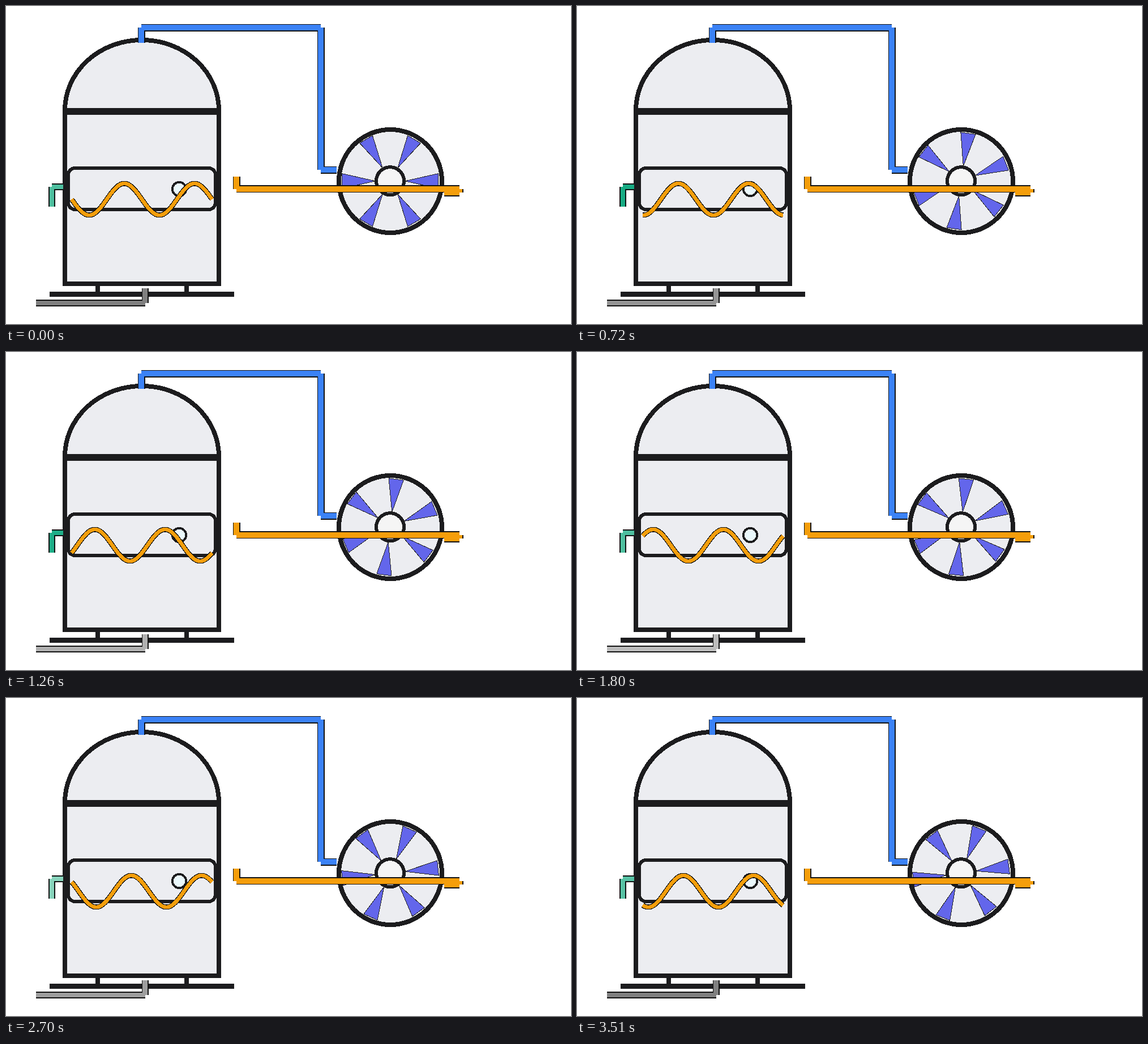
Recreate the animation shown at these times as an HTML page. Size 998x561 px, loop 3.6 s.

```html
<!DOCTYPE html>
<html lang="en">
<head>
<meta charset="utf-8">
<title>Tank and turbine</title>
<style>
  html, body { margin: 0; width: 100%; height: 100%; overflow: hidden; background: #fff; }
  svg { display: block; width: 998px; height: 561px; shape-rendering: crispEdges; fill: none; }
  .shell { fill: #ecedf1; stroke: #1c1c1e; }
  .edge { stroke: #111; }
</style>
</head>
<body>
<svg viewBox="0 0 998 561">
  <g class="shell" stroke-width="8">
    <path d="M161.5 492V506M318.5 492V506"/>
    <path d="M77 508H403" stroke-width="9"/>
    <path d="M104 184A136 124 0 0 1 376 184Z"/>
    <rect x="104" y="187.5" width="272" height="302.5"/>
    <rect x="110" y="286" width="260" height="73" rx="12" stroke-width="6"/>
    <circle cx="306" cy="323" r="12.2" stroke-width="4" fill="#eaf8fc" style="fill:#eaf8fc"/>
    <circle cx="679" cy="309" r="91" stroke-width="8"/>
  </g>
  <g id="blades" fill="#6366eb" stroke="#222" stroke-width="1"></g>
  <circle class="shell" cx="678.5" cy="308.7" r="24.5" stroke-width="6" style="fill:#f5f5f5"/>
  <g id="pipes"></g>
  <path id="waveEdge" class="edge" stroke-width="9"/>
  <path id="wave" stroke="#f59e0b" stroke-width="6.6"/>
</svg>
<script>
const STEP = 90, LOOP = 3600, TAU = 2 * Math.PI;
const byId = id => document.getElementById(id);

function add(parent, attrs) {
  const el = document.createElementNS('http://www.w3.org/2000/svg', 'path');
  for (const key in attrs) el.setAttribute(key, attrs[key]);
  return parent.appendChild(el);
}

// Each straight run is its own subpath, so corners stay notched.
function pipe(color, width, ...points) {
  const d = points.slice(1).map((p, i) => `M${points[i]}L${p}`).join('');
  add(byId('pipes'), { d, class: 'edge', 'stroke-width': width });
  return add(byId('pipes'), { d, stroke: color, 'stroke-width': width - 3.4 });
}

pipe('#3b82f6', 13, [239, 64.5], [239, 38], [556, 38], [556, 289], [584, 289]);
pipe('#f59e0b', 13, [407, 301], [407, 322.7], [801, 322.7], [801, 329], [774, 329]);
const drain = pipe('#808080', 12, [53, 524], [245.5, 524], [245.5, 498]);
const inlet = pipe('#4ebf9f', 12, [101, 319], [81, 319], [81, 354]);

for (let a = 0; a < 360; a += 60)
  add(byId('blades'), { d: 'M26.5 0L85 -13.2V13.2Z', transform: `rotate(${a})` });

function wavePath(phase) {
  let d = '';
  for (let x = 0; x <= 248; x += 2)
    d += `${d ? 'L' : 'M'}${116 + x} ${(341 + 28 * Math.sin(TAU * x / 124 + phase)).toFixed(2)}`;
  return d;
}

function draw(ms) {
  const t = Math.floor(ms % LOOP / STEP) * STEP;
  const cycle = TAU * t / LOOP, s = Math.sin(cycle);
  const grey = Math.round(158 - 30 * Math.cos(cycle));
  const d = wavePath(TAU * t / 3000);

  byId('wave').setAttribute('d', d);
  byId('waveEdge').setAttribute('d', d);
  byId('blades').setAttribute('transform', `translate(678.5 308.8) rotate(${0.22 * t})`);
  drain.setAttribute('stroke', `rgb(${grey},${grey},${grey})`);
  inlet.setAttribute('stroke',
    `rgb(${Math.round(78 - 58 * s)},${Math.round(191 - 21 * s)},${Math.round(159 - 29 * s)})`);
}

const start = performance.now();
function tick() {
  draw(performance.now() - start);
  requestAnimationFrame(tick);
}
tick();
</script>
</body>
</html>
```
